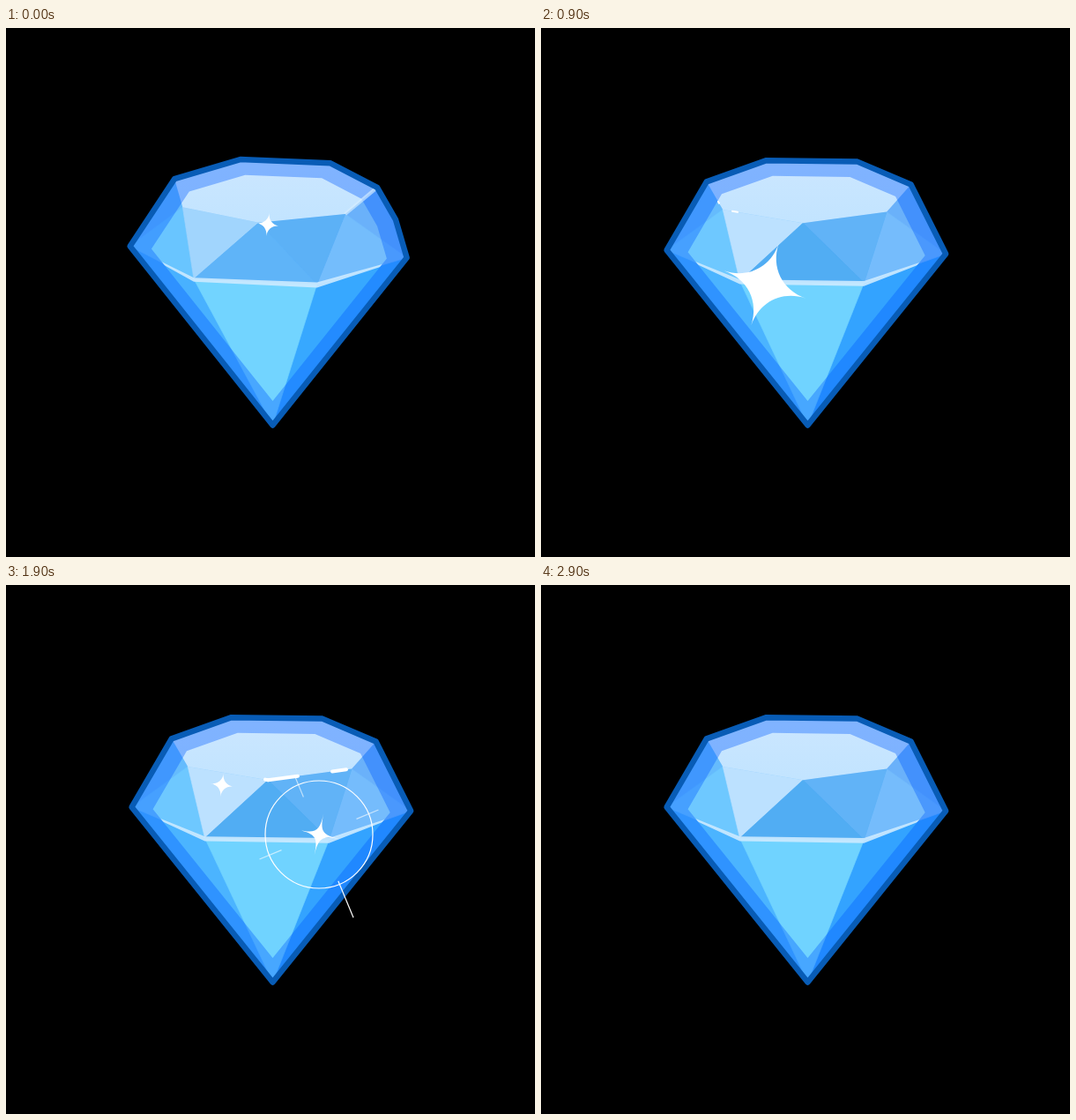
These frames come from a looping animation (600 by 600 pixels, 3000 ms). An HTML page with a canvas:

```html
<!DOCTYPE html>
<html lang="en">
<head>
<meta charset="utf-8">
<title>Diamond</title>
<style>
  html, body { margin: 0; width: 100%; height: 100%; overflow: hidden; background: #000; }
  canvas { display: block; width: 600px; height: 600px; }
</style>
</head>
<body>
<canvas id="stage" width="600" height="600"></canvas>
<script>
const ctx = document.getElementById('stage').getContext('2d');
const LOOP = 3000, STEP = 100, TURN = 1000;
const SIDES = 7, SLICE = 360 / SIDES, CX = 302.5;
const CULET = [CX, 450.5];
const rad = d => d * Math.PI / 180;
const wrap = d => ((d + 180) % 360 + 360) % 360 - 180;

// Facet colours by the direction they face (0 = towards the viewer)
const CROWN = [
  [-85, 100, 185, 252], [-57, 105, 198, 255], [-45, 125, 205, 255], [-32, 165, 214, 253],
  [-28, 190, 226, 255], [-8, 96, 180, 248], [-2, 80, 172, 242], [18, 92, 177, 246],
  [46, 118, 190, 252], [69, 106, 177, 250]
];
const PAVILION = [
  [-60, 72, 176, 255], [-33, 86, 196, 255], [-6, 116, 213, 255],
  [18, 90, 200, 255], [46, 52, 165, 255], [69, 45, 150, 255]
];

// Dash pairs on the table edge: time, x of both dashes, width
const GLINTS = [
  [[200, 395, 400, 405, 410, 2], [500, 212, 240, 287, 309, 7], [900, 200, 203, 216, 224, 2]],
  [[1600, 395, 400, 405, 410, 2], [1900, 292, 333, 368, 388, 4], [2500, 230, 238, 258, 266, 4]]
];

const SIZE = [[0, 0], [100, 13], [150, 21], [250, 49], [300, 46], [400, 24], [500, 0]];
const RING = [[300, 18], [400, 61], [500, 72]];
const EVEN = [1, 1, 1, 1];
const STARS = [
  { at: 2900, x: 297, y: 223, ray: 247 },
  { at: 350, x: 359, y: 340, ray: 157 },
  { at: 650, x: 254, y: 291, ray: 200 },
  { at: 1000, x: 215, y: 250, ray: 157 },
  { at: 1500, x: 355, y: 283, ray: 67.5, spin: -0.3 },
  { at: 1800, x: 245, y: 227, ray: 157 },
  { at: 2200, x: 371, y: 230, ray: 247, spin: 0.31, arms: [1, 1, 0.45, 0.72] }
];

// Interpolates rows of [key, ...values]
function sample(rows, k) {
  if (k <= rows[0][0]) return rows[0].slice(1);
  for (let i = 1; i < rows.length; i++) {
    const a = rows[i - 1], b = rows[i];
    if (k <= b[0]) {
      const f = (k - a[0]) / (b[0] - a[0]);
      return a.slice(1).map((v, j) => v + (b[j + 1] - v) * f);
    }
  }
  return rows[rows.length - 1].slice(1);
}

const onTable = d => [CX + 119 * Math.sin(rad(d)), 184.2 + 37 * Math.cos(rad(d))];
const onGirdle = d => [CX + 162.5 * Math.sin(rad(d)), 243 + 50 * Math.cos(rad(d))];
const inset = ([x, y]) => [CX + (x - CX) * 0.85, 267 + (y - 267) * 0.85];

function hull(points) {
  const half = list => {
    const out = [];
    for (const p of list) {
      while (out.length > 1) {
        const [a, b] = out.slice(-2);
        if ((b[0] - a[0]) * (p[1] - a[1]) - (b[1] - a[1]) * (p[0] - a[0]) > 0) break;
        out.pop();
      }
      out.push(p);
    }
    return out.slice(0, -1);
  };
  const sorted = [...points].sort((a, b) => a[0] - b[0] || a[1] - b[1]);
  return [...half(sorted), ...half(sorted.reverse())];
}

function poly(points) {
  const path = new Path2D();
  points.forEach(([x, y], i) => i ? path.lineTo(x, y) : path.moveTo(x, y));
  path.closePath();
  return path;
}

function facet(points, rows, angle) {
  const path = poly(points);
  ctx.fillStyle = ctx.strokeStyle = `rgb(${sample(rows, angle).map(Math.round)})`;
  ctx.lineWidth = 0.7;
  ctx.fill(path);
  ctx.stroke(path);
}

function line(a, b, width, color) {
  ctx.lineWidth = width;
  ctx.strokeStyle = color;
  ctx.beginPath();
  ctx.moveTo(...a);
  ctx.lineTo(...b);
  ctx.stroke();
}

function sheen(phase, table) {
  const alpha = Math.max(0, 1 - Math.abs(phase - 0.5) / 0.3);
  if (!alpha) return;
  const x = 295 + 250 * (phase - 0.5);
  ctx.save();
  ctx.clip(table);
  ctx.fillStyle = `rgba(255,255,255,${0.27 * alpha})`;
  for (const [l, r] of [[-200, -25], [-17, 0]])
    ctx.fill(poly([[x + l, 150], [x + r, 150], [x + r - 80, 220], [x + l - 80, 220]]));
  ctx.restore();
}

function gem(t) {
  const phase = t % TURN / TURN;
  const base = -7.7 - SLICE * phase;
  const ids = [...Array(SIDES).keys()];
  const angles = ids.map(i => wrap(base + i * SLICE));
  const mids = angles.map(a => wrap(a + SLICE / 2));
  const top = angles.map(onTable), rim = mids.map(onGirdle);
  const next = i => (i + 1) % SIDES, prev = i => (i + SIDES - 1) % SIDES;
  const outer = hull([...top, ...rim, CULET]);
  const shape = poly(outer), core = poly(outer.map(inset)), table = poly(top);

  ctx.fillStyle = '#48a0fa';
  ctx.fill(shape);
  ctx.save();
  ctx.clip(shape);

  const backFirst = list => [...ids].sort((a, b) => Math.cos(rad(list[a])) - Math.cos(rad(list[b])));
  for (const i of backFirst(angles)) facet([rim[prev(i)], rim[i], CULET], PAVILION, angles[i]);

  const crown = ids.flatMap(i => [
    { a: angles[i], pts: [top[i], rim[prev(i)], rim[i]] },
    { a: mids[i], pts: [top[i], top[next(i)], rim[i]] }
  ]);
  crown.sort((p, q) => Math.cos(rad(p.a)) - Math.cos(rad(q.a)));
  crown.forEach(f => facet(f.pts, CROWN, f.a));

  const glow = ctx.createLinearGradient(0, 160, 0, 221);
  glow.addColorStop(0, '#cae6ff');
  glow.addColorStop(1, '#c2e4ff');
  ctx.fillStyle = glow;
  ctx.fill(table);

  // Light strip along the front of the girdle
  ctx.save();
  ctx.clip(core);
  const front = ids.filter(i => Math.abs(mids[i]) < 100).sort((a, b) => mids[a] - mids[b]);
  const shift = s => i => [rim[i][0], rim[i][1] + s * Math.cos(rad(mids[i])) ** 2];
  ctx.fillStyle = 'rgba(205,234,255,.9)';
  ctx.fill(poly([...front.map(shift(-2.2)), ...front.reverse().map(shift(4.4))]));
  ctx.restore();

  const band = new Path2D(shape);
  band.addPath(core);
  ctx.fillStyle = 'rgba(0,90,255,.37)';
  ctx.fill(band, 'evenodd');

  sheen(phase, table);
  for (const i of ids) {
    const lit = 1 - Math.abs(mids[i] - 67) / 7;
    if (lit > 0) line(top[i], top[next(i)], 4, `rgba(215,238,255,${lit})`);
  }
  ctx.restore();

  ctx.lineWidth = 6.5;
  ctx.lineJoin = 'round';
  ctx.strokeStyle = '#085cb6';
  ctx.stroke(shape);

  const edge = ids.filter(i => Math.abs(angles[i]) < 110)
    .sort((a, b) => angles[a] - angles[b]).map(i => top[i]);
  glints(t, edge);
}

function glints(t, edge) {
  ctx.lineCap = 'round';
  for (const rows of GLINTS) {
    if (t < rows[0][0] || t > rows[rows.length - 1][0]) continue;
    const [a, b, c, d, width] = sample(rows, t);
    for (const [l, r] of [[a, b], [c, d]]) {
      const at = x => [x, sample(edge, x)[0]];
      const cap = Math.min(width, r - l) / 2;
      const inner = edge.filter(p => p[0] > l + cap && p[0] < r - cap);
      const pts = [at(l + cap), ...inner, at(r - cap)];
      for (let i = 1; i < pts.length; i++) line(pts[i - 1], pts[i], width, '#fff');
    }
  }
  ctx.lineCap = 'butt';
}

function star(s, t) {
  const age = (t - s.at + LOOP) % LOOP;
  if (age <= 0 || age >= 500) return;
  const [size] = sample(SIZE, age);
  const turn = 0.0013 * age + (s.spin || 0);
  const pinch = age > 250 ? 0.16 : 0.42;
  const tips = (s.arms || EVEN).map((k, i) => {
    const a = turn + i * Math.PI / 2;
    return [size * k * Math.cos(a), size * k * Math.sin(a)];
  });

  ctx.save();
  ctx.translate(s.x, s.y);
  ctx.fillStyle = '#fff';
  ctx.beginPath();
  ctx.moveTo(...tips[0]);
  tips.forEach((p, i) => {
    const q = tips[(i + 1) % 4];
    ctx.bezierCurveTo(p[0] * pinch, p[1] * pinch, q[0] * pinch, q[1] * pinch, ...q);
  });
  ctx.fill();

  if (age > 300) {
    const [r] = sample(RING, age);
    ctx.globalAlpha = Math.min(1, (500 - age) / 100);
    ctx.strokeStyle = '#fff';
    ctx.lineWidth = 1.2;
    ctx.beginPath();
    ctx.arc(0, 0, r, 0, 2 * Math.PI);
    ctx.stroke();
    for (let i = 0; i < 4; i++) {
      const a = rad(s.ray + i * 90), c = Math.cos(a) * r / 61, n = Math.sin(a) * r / 61;
      const [from, to] = i ? [46, 73] : [57, 102];
      line([c * from, n * from], [c * to, n * to], 1.2, i ? 'rgba(255,255,255,.6)' : '#fff');
    }
  }
  ctx.restore();
}

const start = performance.now();
function draw() {
  const t = Math.floor((performance.now() - start) % LOOP / STEP) * STEP;
  ctx.fillStyle = '#000';
  ctx.fillRect(0, 0, 600, 600);
  gem(t);
  STARS.forEach(s => star(s, t));
  requestAnimationFrame(draw);
}
draw();
</script>
</body>
</html>
```
